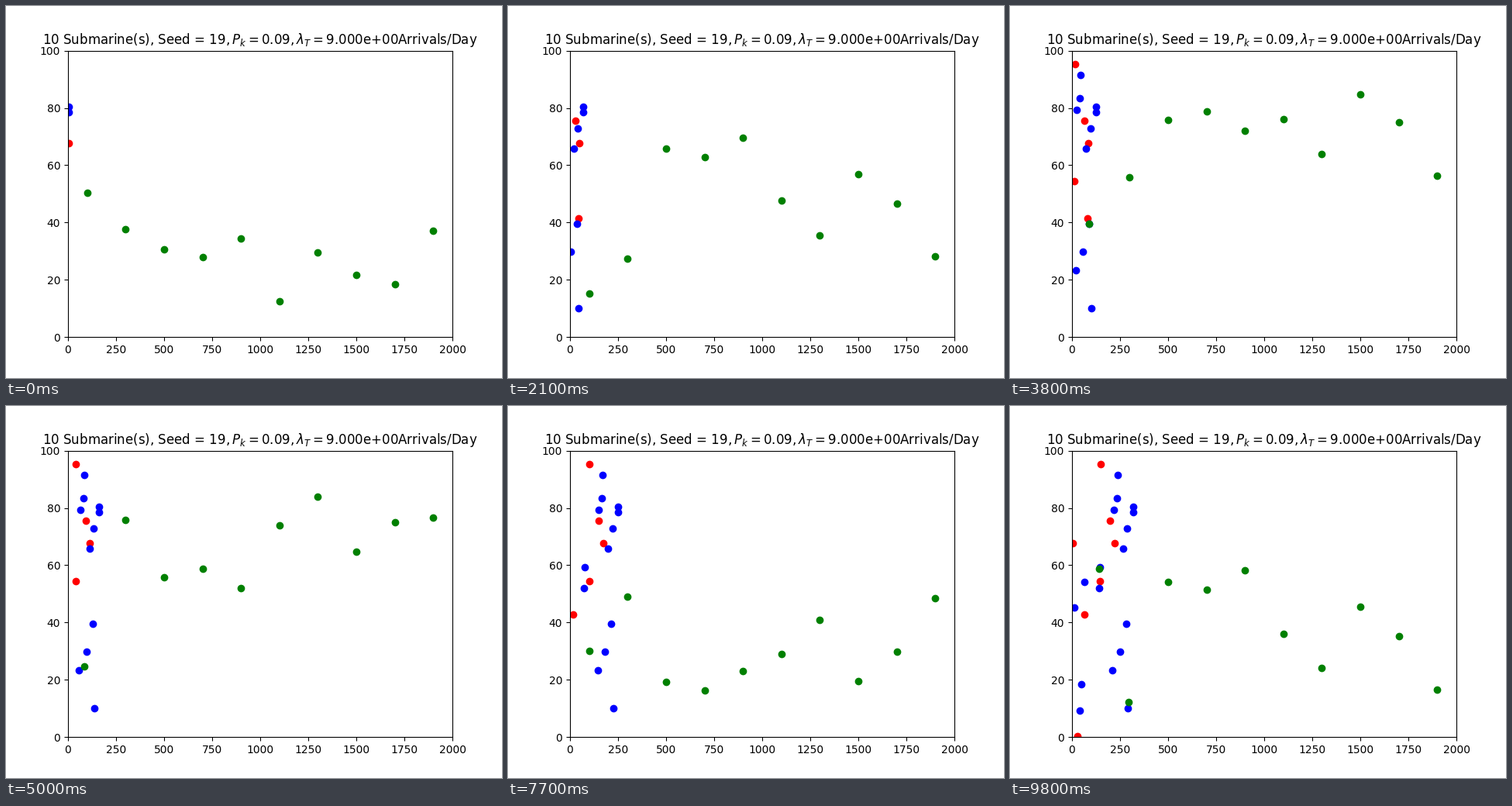
A matplotlib script for the animation above (9.9 s loop, 640x480 px).

```python
import math
import matplotlib.pyplot as plt
from matplotlib.animation import FuncAnimation

FRAMES = 99
INTERVAL = 100

# Distance covered per frame
SHIP_SPEED = {"b": 3.2, "r": 2.222}
PATROL_SPEED = 1.67
CHASE_SPEED = 3.45

LOW, HIGH = 15, 85        # patrol band of the submarines
DETECT_RANGE = 20.5
RELOAD = 20               # frames without a chase after a sinking
SHOTS_PER_HIT = 11        # close to 1 / P_k

# Arrivals as (frame, lane)
ARRIVALS = {
    "r": [(0, 67.7), (2, 41.4), (10, 75.5), (32, 95.2), (33, 54.4),
          (70, 42.7), (86, 0.3), (97, 67.7)],
    "b": [(0, 80.4), (0, 78.5), (8, 10), (9, 72.8), (11, 39.5), (16, 65.8),
          (21, 29.7), (25, 91.5), (26, 83.4), (31, 79.3), (33, 23.3),
          (54, 59.2), (55, 52), (79, 54.1), (84, 18.4), (86, 9.2),
          (95, 45.3)],
}

# Starting heights; a minus sign means heading down
SUB_STARTS = [-50.3, -37.6, 30.6, 27.8, 34.5, 12.5, -29.5, 21.8, -18.4, -37]


class Ship:
    def __init__(self, color, start, lane):
        self.color, self.start, self.lane = color, start, lane
        self.sunk = False

    def afloat(self, frame):
        return frame >= self.start and not self.sunk

    def point(self, frame):
        return SHIP_SPEED[self.color] * (frame - self.start + 1), self.lane


class Sub:
    def __init__(self, x, start):
        self.x, self.y = x, abs(start)
        self.heading = math.copysign(1, start)
        self.attacked = set()
        self.ready = 0

    def patrol(self):
        self.y += self.heading * PATROL_SPEED
        limit = HIGH if self.heading > 0 else LOW
        if (self.y - limit) * self.heading > 0:
            self.y = 2 * limit - self.y
            self.heading *= -1

    def distance(self, point):
        return math.dist((self.x, self.y), point)

    def step(self, frame, ships):
        """Chase the nearest fresh contact, or patrol; return a ship reached."""
        contacts = [s for s in ships
                    if s.afloat(frame) and s not in self.attacked
                    and self.distance(s.point(frame)) < DETECT_RANGE]
        if frame < self.ready or not contacts:
            self.patrol()
            return None
        target = min(contacts, key=lambda s: self.distance(s.point(frame)))
        tx, ty = target.point(frame)
        part = min(1, CHASE_SPEED / max(self.distance((tx, ty)), 1e-9))
        self.x += part * (tx - self.x)
        self.y += part * (ty - self.y)
        if part < 1:
            return None
        self.attacked.add(target)
        self.heading = -1
        return target


def simulate():
    """Point lists by colour for every frame."""
    ships = [Ship(color, *arrival)
             for color, arrivals in ARRIVALS.items() for arrival in arrivals]
    subs = [Sub(100 + 200 * i, start) for i, start in enumerate(SUB_STARTS)]
    shots = 0
    history = []
    for frame in range(FRAMES):
        for sub in subs if frame else []:
            target = sub.step(frame, ships)
            if target:
                shots += 1
                if shots % SHOTS_PER_HIT == 2:
                    target.sunk = True
                    sub.ready = frame + RELOAD
        points = {color: [s.point(frame) for s in ships
                          if s.color == color and s.afloat(frame)]
                  for color in ARRIVALS}
        points["g"] = [(sub.x, sub.y) for sub in subs]
        history.append(points)
    return history


# Whole-pixel kerning
plt.rcParams["text.kerning_factor"] = 6

fig, ax = plt.subplots(figsize=(6.4, 4.8), dpi=100)
ax.set_xlim(0, 2000)
ax.set_ylim(0, 100)
ax.set_title(r"10 Submarine(s), Seed = 19$, P_k = 0.09, \lambda_T = $"
             "9.000e+00Arrivals/Day")

history = simulate()
dots = {color: ax.plot([], [], color + "o")[0] for color in "rbg"}


def update(frame):
    for color, line in dots.items():
        line.set_data(*zip(*history[frame][color]))
    return list(dots.values())


anim = FuncAnimation(fig, update, frames=FRAMES, interval=INTERVAL,
                     repeat=True, repeat_delay=0)
plt.show()
```
